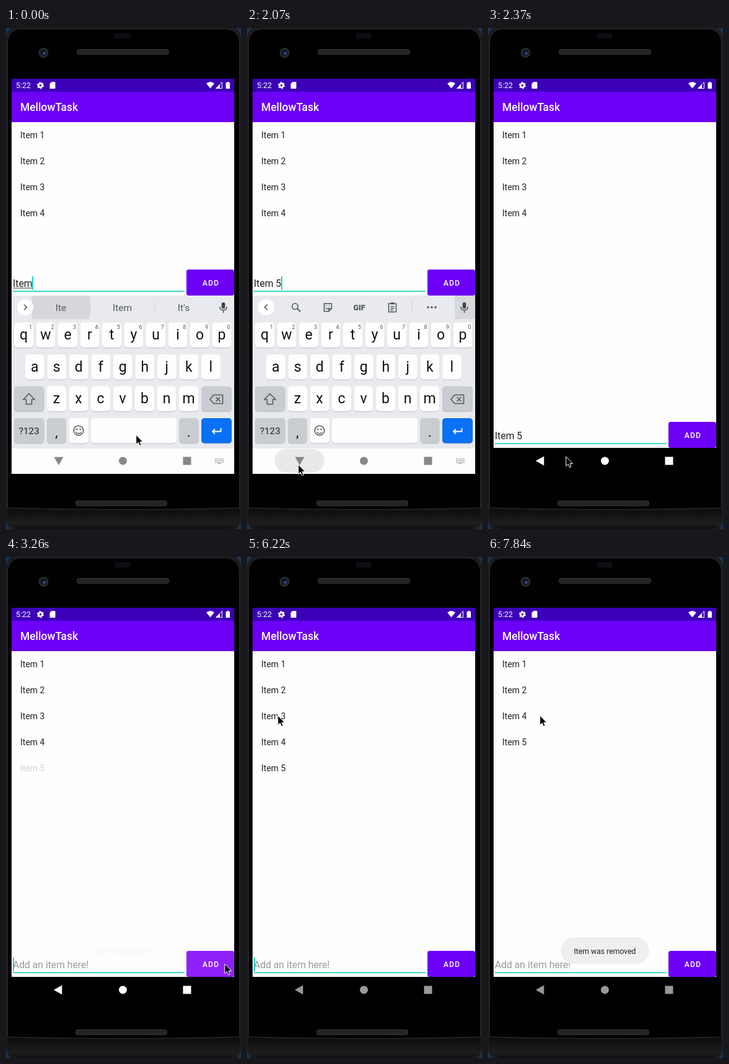
An HTML page for the animation above (7.99 s loop, 379 px wide and 809 px high).

```html
<!DOCTYPE html>
<html lang="en">
<head>
<meta charset="utf-8">
<title>To-do list demo</title>
<style>
html, body { margin: 0; width: 100%; height: 100%; overflow: hidden; background: #000; }
svg { display: block; width: 100%; height: 100%; font-family: Roboto, sans-serif; }
.mid { text-anchor: middle; }
.line { fill: none; stroke: #55585c; stroke-width: 1.6; }
</style>
</head>
<body>
<svg id="stage" viewBox="0 0 379 809">
  <defs>
    <linearGradient id="chin" x1="0" y1="0" x2="0" y2="1">
      <stop offset="0" stop-color="#0c0c0c"/><stop offset=".75" stop-color="#1e1e1e"/><stop offset="1" stop-color="#0d0d0d"/>
    </linearGradient>
    <pattern id="mesh" width="3" height="3" patternUnits="userSpaceOnUse">
      <rect width="3" height="3" fill="#2a2a2a"/><circle cx="1.5" cy="1.5" r=".9" fill="#151515"/>
    </pattern>
    <clipPath id="aboveNav"><rect x="9" y="82" width="359" height="597"/></clipPath>
  </defs>

  <!-- phone body -->
  <rect width="379" height="809" fill="#1a3452"/>
  <rect x="0" y="-6" width="379" height="822" rx="24" fill="#1c1c1c"/>
  <path d="M2 776Q190 782 377 776V788Q374 809 354 809H25Q5 809 2 788Z" fill="url(#chin)"/>
  <path d="M2.500 24Q4 1.500 26 1.500H353Q375 1.500 376.500 24V775Q190 780 2.500 775Z" fill="#010101" stroke="#2c2c2c"/>
  <rect x="175" y="8" width="26" height="9" rx="4" fill="#0d0d14"/>
  <g fill="url(#mesh)" stroke="#343434">
    <rect x="114.500" y="34.500" width="148" height="8" rx="3"/>
    <rect x="112.500" y="763.500" width="147" height="8" rx="3"/>
  </g>
  <circle cx="60.500" cy="40" r="8" fill="#29292b"/>
  <circle cx="60.500" cy="40" r="5" fill="#101222"/>
  <circle cx="61.500" cy="41" r="2.500" fill="#31437f"/>

  <!-- app -->
  <rect x="9" y="82" width="359" height="638" fill="#000"/>
  <rect x="9" y="152" width="359" height="526" fill="#fefefe"/>
  <rect x="9" y="82" width="359" height="21" fill="#3c00b8"/>
  <rect x="9" y="103" width="359" height="49" fill="#6c00f7"/>
  <g fill="#fff">
    <text x="16" y="97.300" font-size="12.400">5:22</text>
    <circle cx="55.500" cy="92.700" r="3.100" fill="none" stroke="#fff" stroke-width="2.600"/>
    <circle cx="55.500" cy="92.700" r="4.800" fill="none" stroke="#fff" stroke-width="1.600" stroke-dasharray="2.500 2.526"/>
    <path d="M73.500 87H78.500Q79.500 87 79.500 88V97Q79.500 98 78.500 98H71.500Q70.500 98 70.500 97V90Z"/>
    <path d="M323 89.500Q329.500 84.500 336 89.500L329.500 97.500Z"/>
    <path d="M338.500 97.500L348.500 87.500V97.500Z" fill="none" stroke="#fff"/>
    <path d="M338 98L345 91V98Z"/>
    <path d="M354.500 88.300H356.500V87H359.500V88.300H361V98H354.500Z"/>
    <text x="23" y="134" font-size="17.460" font-weight="500">MellowTask</text>
  </g>
  <g id="items" font-size="14" fill="#212121"></g>

  <g id="entry">
    <rect x="11" y="670.300" width="277" height="1.700" fill="#1fd3c1"/>
    <text id="entryText" x="11" y="664" font-size="15.700" xml:space="preserve"></text>
    <rect id="composing" x="11.500" y="665.500" width="31.500" height="1" fill="#333"/>
    <rect id="caret" y="647" width="2" height="21.500" fill="#16d5c2"/>
    <rect id="addButton" x="291" y="636" width="77" height="42" rx="3.500"/>
    <text class="mid" x="330.500" y="662" font-size="12.200" font-weight="500" letter-spacing="1.090" fill="#fff">ADD</text>
  </g>

  <g id="toast">
    <rect id="toastBox" y="614" height="43" rx="21.500" fill="#efefef"/>
    <text id="toastText" class="mid" x="188.500" y="640.500" font-size="12.220" fill="#222"></text>
  </g>

  <!-- keyboard -->
  <g clip-path="url(#aboveNav)"><g id="keyboard">
    <rect x="9" y="432" width="359" height="248" fill="#e8eaed"/>
    <rect id="highlight" y="432" height="38" fill="#d6d8dc"/>
    <circle cx="31" cy="451" r="13" fill="#fff"/>
    <path id="chevron" class="line" stroke-width="1.800"/>
    <g id="words" class="mid" font-size="15.500" fill="#55585c">
      <path d="M135.500 441V461M240 441V461" stroke="#d0d2d6"/>
      <text x="88.500" y="457"></text><text x="187.500" y="457"></text><text x="286.500" y="457"></text>
    </g>
    <g id="tools" class="line">
      <circle cx="77.500" cy="449.500" r="4.700"/><path d="M81 453L86 458" stroke-width="2"/>
      <path d="M124.500 445H136.500V453L132 457.500H124.500ZM132 457.500V453H136.500M127 452Q129.500 455 132 452M127.500 448.500H129M132 448.500H133.500"/>
      <text x="171.500" y="455.500" font-size="12.500" font-weight="900" fill="#55585c" stroke="none">GIF</text>
      <path d="M228.500 445H240.500V458.500H228.500ZM231.500 445.500H237.500M231.500 450H237.500M231.500 453H237.500M231.500 455.800H235.500"/>
      <path d="M232 444.500H237" stroke-width="3"/>
      <path d="M266 441V461" stroke="#d0d2d6" stroke-width="1"/>
      <g fill="#55585c" stroke="none"><circle cx="292" cy="451" r="1.800"/><circle cx="298" cy="451" r="1.800"/><circle cx="304" cy="451" r="1.800"/></g>
    </g>
    <rect x="347.700" y="443" width="5.600" height="10" rx="2.800" fill="#404347"/>
    <path class="line" d="M345 450Q345 455.500 350.500 455.500Q356 455.500 356 450M350.500 455.500V460"/>
    <g id="keys"></g>
    <g class="line">
      <path d="M37 590.500L46 600H41.500V607.500H32.500V600H28Z"/>
      <path d="M335 592.500H349.500V606.500H335L329 599.500ZM338.500 596L345.500 603M345.500 596L338.500 603"/>
      <circle cx="117" cy="650" r="7.800"/><path d="M112.800 652.500Q117 657.500 121.200 652.500"/>
      <path d="M346.500 646V651.500H333M337 647.500L333 651.500L337 655.500" stroke="#fff" stroke-width="1.800"/>
    </g>
    <g fill="#55585c"><circle cx="114.300" cy="648" r="1.300"/><circle cx="119.700" cy="648" r="1.300"/></g>
  </g></g>

  <!-- navigation bar -->
  <g id="lightNav">
    <rect x="9" y="679" width="359" height="41" fill="#fdfdfd"/>
    <rect id="navRipple" x="44.500" y="680" width="80" height="38" rx="19" fill="#e9e9e9"/>
    <path d="M337 696H351M337 698.700H351M337 701.400H351" stroke="#9a9a9a" stroke-width="1.500" stroke-dasharray="1.600 .9"/>
    <path d="M341 703.500H347" stroke="#9a9a9a"/>
  </g>
  <g id="nav">
    <path id="back" d="M77 699L90.300 691.500V706.500Z"/>
    <circle cx="188.500" cy="699" r="6.500"/>
    <rect x="285.500" y="692.500" width="13" height="13"/>
  </g>

  <path id="pointer" d="M.8 0V15.400L4.300 12.200L6.700 17.600L9.200 16.500L6.900 11.300H11.700Z" fill="#000" stroke="#fff" stroke-linejoin="round"/>
</svg>

<script>
const LOOP = 7990, STEPS = 54, STEP = LOOP / STEPS, ROW = 42;
const $ = id => document.getElementById(id);
const set = (el, attrs) => { for (const name in attrs) el.setAttribute(name, attrs[name]); };
const show = (id, on) => set($(id), { opacity: +on });
function add(parent, tag, attrs, text = "") {
  const el = document.createElementNS("http://www.w3.org/2000/svg", tag);
  set(el, attrs);
  el.textContent = text;
  parent.append(el);
  return el;
}

// Piecewise linear value; points are [step, value...]
function track(points, k) {
  let i = 0;
  while (i < points.length - 2 && k >= points[i + 1][0]) i++;
  const [a, b] = [points[i], points[i + 1]];
  const u = Math.min(1, Math.max(0, (k - a[0]) / (b[0] - a[0])));
  return a.slice(1).map((v, j) => v + (b[j + 1] - v) * u);
}

function key(x, y, width, fill, label = "", size = 23, labelY = y + 27.5, weight = 400) {
  const box = { x, width, height: 40.5, rx: 5 };
  add($("keys"), "rect", { ...box, y: y + 1, fill: "#bcbfc4" });
  add($("keys"), "rect", { ...box, y, fill });
  add($("keys"), "text", { class: "mid", x: x + width / 2, y: labelY, "font-size": size, "font-weight": weight,
    fill: weight > 400 ? "#43464a" : "#111" }, label);
}
const GREY = "#c9ccd1", WHITE = "#fefefe";
[["qwertyuiop", 13, 475.5], ["asdfghjkl", 30.8, 527], ["zxcvbnm", 66, 578.5]].forEach(([letters, x, y], row) =>
  [...letters].forEach((letter, i) => {
    key(x + 35.5 * i, y, 31, WHITE, letter);
    if (!row) add($("keys"), "text", { class: "mid", x: 39.5 + 35.5 * i, y: 486, "font-size": 9, fill: "#55585c" }, (i + 1) % 10);
  }));
key(13, 578.5, 48.5, GREY);
key(315, 578.5, 49, GREY);
key(13, 630, 48.5, GREY, "?123", 15, 656, 500);
key(66, 630, 31, GREY, ",", 22, 660);
key(101.5, 630, 31.5, WHITE);
key(137, 630, 138, WHITE);
key(279.5, 630, 31, GREY, ".", 22, 660);
key(315, 630, 49, "#0a70f4");

const items = [1, 2, 3, 4, 5].map(n => add($("items"), "text", { x: 23 }, "Item " + n));

const pointerPath = [[7, 209, 657], [8, 200, 670], [9, 165, 715], [10, 120, 742], [11, 95, 734], [12, 85, 718],
  [13, 82, 706], [14, 82, 705], [15, 95, 702], [16, 125, 692], [18, 250, 672], [20, 345, 658], [22, 352, 657],
  [30, 352, 657], [31, 280, 560], [32, 160, 429], [34, 80, 300], [36, 50, 262], [38, 49, 256],
  [48, 49, 256], [53, 83, 256]];
const toastFade = [[21, 0], [22, .04], [23, .6], [24, .95], [25, 1], [36, 1], [37, .6], [38, .04], [39, 0],
  [43, 0], [44, .04], [45, .6], [46, .95], [47, 1]];

function suggestions(k) {
  if (k < 2) return ["Ite", "Item", "It's"];
  if (k < 5) return ["Items", "Item", "Itemize"];
  return k < 6 ? ["is", "the", "and"] : ["", "", ""];
}

function drawEntry(k) {
  const typing = k < 15, hint = k >= 22;
  set($("entry"), { transform: `translate(0 ${typing ? -246 : 0})` });
  set($("entryText"), { fill: hint ? "#999" : "#212121" });
  $("entryText").textContent = hint ? "Add an item here!" : k < 5 ? "Item" : k < 6 ? "Item " : "Item 5";
  show("composing", k < 5);
  // The caret blinks twice a second, restarting after each edit.
  const blinkStart = hint ? 3200 : 735;
  const caretOn = k < 5 || Math.floor((k * STEP - blinkStart) / 500) % 2 === 0;
  set($("caret"), { x: hint ? 11 : k < 5 ? 42 : k < 6 ? 46 : 55, opacity: +caretOn });
  const [press] = track([[20, 0], [21, .6], [22, 1], [23, 1], [25, 0]], k);
  set($("addButton"), { fill: `rgb(${108 + 36 * press},${32 * press},${247 + 4 * press})` });
}

function drawKeyboard(k) {
  const tools = k >= 8, leaving = k === 15;
  set($("keyboard"), { transform: `translate(0 ${leaving ? 150 : 0})`, opacity: k < 15 ? 1 : leaving ? .5 : 0 });
  show("words", !tools);
  show("tools", tools);
  const words = suggestions(k);
  $("words").querySelectorAll("text").forEach((el, i) => el.textContent = words[i]);
  set($("chevron"), { d: tools ? "M33 446.500L28.500 451L33 455.500" : "M29 446.500L33.500 451L29 455.500" });
  set($("highlight"), tools ? { x: 335, width: 33 } : { x: 42, width: 93 });
}

function drawNav(k) {
  set($("lightNav"), { opacity: k < 15 ? 1 : k === 15 ? .5 : 0 });
  show("navRipple", k === 13 || k === 14);
  const grey = k < 16 ? 135 : track([[31, 255], [38, 153]], k)[0];
  set($("nav"), { fill: `rgb(${grey},${grey},${grey})` });
  set($("back"), { transform: k < 15 ? "rotate(-90 84.500 698.500)" : k === 15 ? "rotate(-45 84.500 698.500)" : "" });
}

function drawItems(k) {
  const [shift] = track([[44, 0], [45, .25], [46, .85], [47, 1]], k);
  items.forEach((el, i) => {
    const opacity = i === 2 ? track([[43, 1], [44, .35], [45, 0]], k)[0]
      : i === 4 ? track([[21, 0], [22, .2], [23, .8], [24, 1]], k)[0] : 1;
    set(el, { y: 178 + ROW * (i - (i > 2 ? shift : 0)), opacity });
  });
}

function drawToast(k) {
  const removed = k > 40, width = removed ? 143 : 129;
  set($("toast"), { opacity: track(toastFade, k)[0] });
  set($("toastBox"), { x: 188.5 - width / 2, width });
  $("toastText").textContent = removed ? "Item was removed" : "Item was added";
}

// The picture advances in even, discrete steps.
function frame(now) {
  const k = Math.floor((now % LOOP + 10) / STEP) % STEPS;
  drawItems(k);
  drawEntry(k);
  drawToast(k);
  drawKeyboard(k);
  drawNav(k);
  const [x, y] = track(pointerPath, k);
  set($("pointer"), { transform: `translate(${x} ${y})` });
  requestAnimationFrame(frame);
}
frame(0);
</script>
</body>
</html>
```
